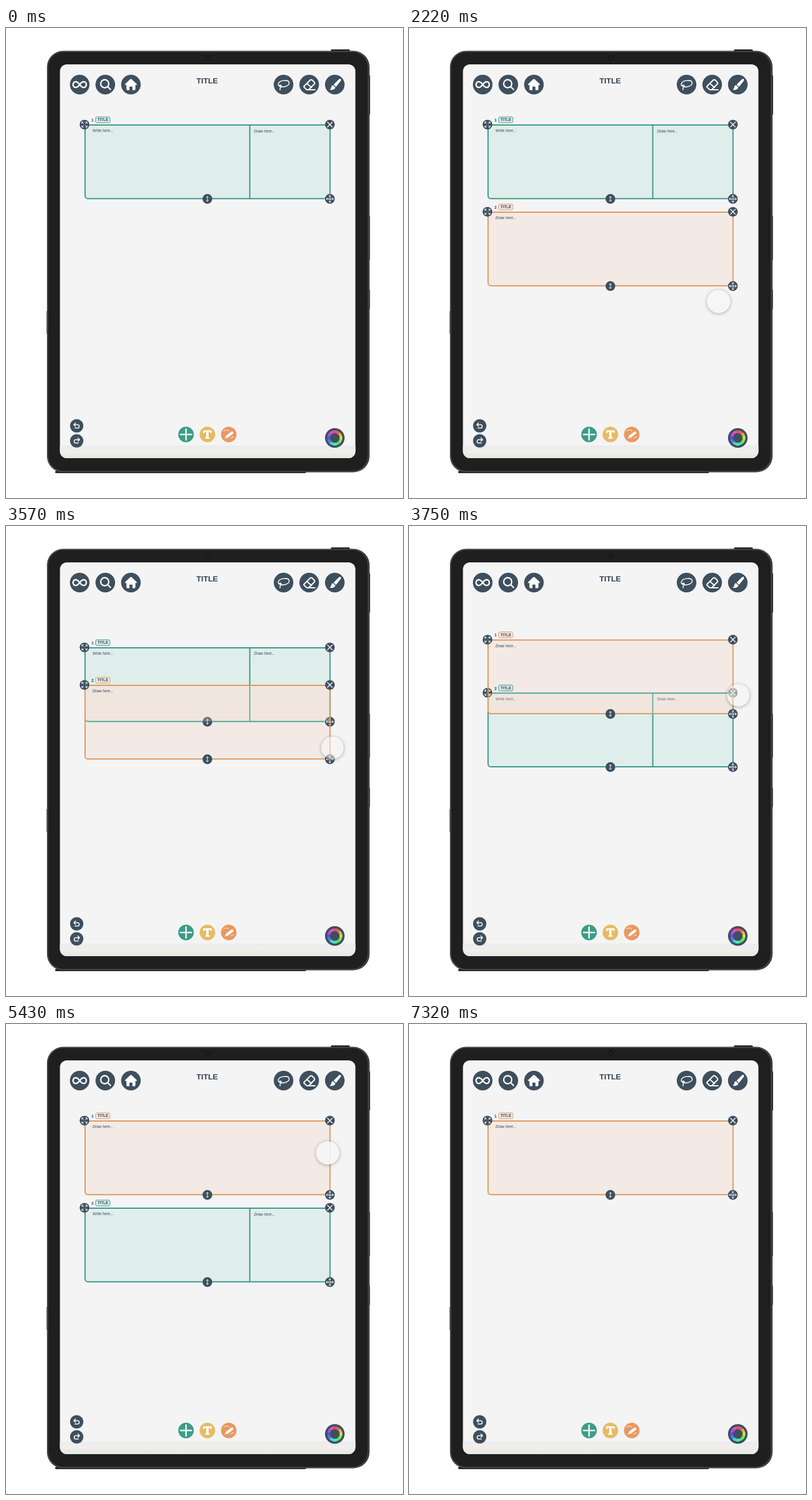
Recreate the animation shown at these times as an HTML page with a canvas. Size 688 by 814 pixels, loop 7350 ms.

```html
<!DOCTYPE html>
<html lang="en">
<head>
<meta charset="utf-8">
<title>Card board</title>
<style>
html, body { margin: 0; width: 100%; height: 100%; overflow: hidden; background: #fff; }
canvas { display: block; width: 688px; height: 814px; }
</style>
</head>
<body>
<canvas id="stage" width="688" height="814"></canvas>
<script>
const ctx = document.getElementById('stage').getContext('2d');
const LOOP = 7350;
const DARK = '#3e4f5e';
const FONT = '"Liberation Sans", Arial, sans-serif';
const ROW = 151;

const clamp = x => Math.max(0, Math.min(1, x));
const span = (t, a, b) => clamp((t - a) / (b - a));
const quad = u => u < .5 ? 2 * u * u : 1 - 2 * (1 - u) ** 2;
const cubic = u => u < .5 ? 4 * u ** 3 : 1 - 4 * (1 - u) ** 3;
const mix = (a, b, u) => a + (b - a) * u;

function disc(x, y, r, fill) {
  ctx.beginPath();
  ctx.arc(x, y, r, 0, Math.PI * 2);
  ctx.fillStyle = fill;
  ctx.fill();
}

function box(x, y, w, h, r, fill, stroke, line = 1) {
  ctx.beginPath();
  ctx.roundRect(x, y, w, h, r);
  if (fill) { ctx.fillStyle = fill; ctx.fill(); }
  if (stroke) { ctx.strokeStyle = stroke; ctx.lineWidth = line; ctx.stroke(); }
}

function label(text, x, y, font, align = 'left', fill = '#33445a') {
  ctx.font = `${font} ${FONT}`;
  ctx.textAlign = align;
  ctx.fillStyle = fill;
  ctx.fillText(text, x, y);
}

// Paths are centred on the button.
function icon(x, y, r, color, { line, width = 2, fill }) {
  disc(x, y, r, color);
  ctx.save();
  ctx.translate(x, y);
  ctx.lineCap = ctx.lineJoin = 'round';
  ctx.strokeStyle = ctx.fillStyle = '#fff';
  ctx.lineWidth = width;
  if (fill) ctx.fill(new Path2D(fill));
  if (line) ctx.stroke(new Path2D(line));
  ctx.restore();
}

function infinityPath() {
  let d = '';
  for (let i = 0; i <= 48; i++) {
    const a = i / 48 * Math.PI * 2, k = 1 + Math.sin(a) ** 2;
    d += `${i ? 'L' : 'M'}${11.5 * Math.cos(a) / k} ${14 * Math.sin(a) * Math.cos(a) / k}`;
  }
  return d + 'Z';
}

const ICONS = {
  infinity: { line: infinityPath(), width: 2.5 },
  search: { line: 'M6 -1.5A7 7 0 1 1 -8 -1.5A7 7 0 1 1 6 -1.5M4.2 3.7L9 8.5', width: 2.4 },
  home: { fill: 'M0 -9.8Q.8 -9.8 1.6 -9L10 -1Q11 .6 9.5 .8H7.8V8Q7.8 9.8 6 9.8H2.6V3.6H-2.6V9.8H-6Q-7.8 9.8 -7.8 8V.8H-9.5Q-11 .6 -10 -1L-1.6 -9Q-.8 -9.8 0 -9.8Z' },
  lasso: { line: 'M-7 3C-13 -1 -6 -7 1 -7C12 -8 12 0 4 3C-1 5 -6 4 -7 2C-7 0 -3 1 -4 3C-5 5 -7 5 -6 9', width: 1.6 },
  eraser: { line: 'M-9 3L2 -8Q3.5 -9 5 -8L9 -4Q10 -2.5 9 -1L-1 9H-4L-9 4.5ZM-4 -2L4 5M-1 9H10', width: 2.2 },
  brush: { fill: 'M9.5 -10Q12 -9 10 -6L2 4L-2 0L7 -9Q8.5 -10.5 9.5 -10ZM-3 1L1 5Q0 10 -9 9Q-6 7 -6 4Q-5.5 1 -3 1Z' },
  undo: { line: 'M-2 -5L-5 -2L-2 1M-5 -2H1.5A2.8 2.8 0 0 1 1.5 3.8H-3', width: 1.5 },
  redo: { line: 'M2 -5L5 -2L2 1M5 -2H-1.5A2.8 2.8 0 0 0 -1.5 3.8H3', width: 1.5 },
  plus: { line: 'M-9.5 0H9.5M0 -9.5V9.5', width: 2.4 },
  type: { fill: 'M-7.3 -7.3H7.3V-2.6H5.4Q5 -4.8 3.5 -4.8H2.1V4.2Q2.1 5.4 4 5.4V7.3H-4V5.4Q-2.1 5.4 -2.1 4.2V-4.8H-3.5Q-5 -4.8 -5.4 -2.6H-7.3Z' },
  scribble: { line: 'M-9 -6Q-4 -9.5 0 -6.5M-7 6.5Q-4 3 -3 6M3 6.5Q6 3.5 8.5 4', width: .9,
    fill: 'M-6 6.5L-4.5 2L4.5 -5Q7 -6 8 -3.5Q8.5 -2 7 -1L-1.5 5.5Z' },
  expand: { line: 'M-1.5 -1.5L-4.5 -4.5V-2M-4.5 -4.5H-2M1.5 -1.5L4.5 -4.5V-2M4.5 -4.5H2M-1.5 1.5L-4.5 4.5V2M-4.5 4.5H-2M1.5 1.5L4.5 4.5V2M4.5 4.5H2', width: 1 },
  close: { line: 'M-4.2 -4.2L4.2 4.2M4.2 -4.2L-4.2 4.2', width: 1.4 },
  resize: { line: 'M0 -4.2V4.2M-1.8 -2.5L0 -4.3L1.8 -2.5M-1.8 2.5L0 4.3L1.8 2.5', width: 1 },
  move: { line: 'M2 0A2 2 0 1 1 -2 0A2 2 0 1 1 2 0', width: 1.2,
    fill: 'M0 -6.8L2.4 -4H-2.4ZM0 6.8L2.4 4H-2.4ZM-6.8 0L-4 -2.4V2.4ZM6.8 0L4 -2.4V2.4Z' }
};

function tablet() {
  ctx.fillStyle = '#fff';
  ctx.fillRect(0, 0, 688, 814);
  box(563, 37, 33, 6, 2, '#292929');
  box(627, 82, 4, 68, 1, '#333');
  for (const [y, h] of [[325, 77], [453, 34]]) box(628, y, 2.7, h, 1, '#333');
  box(70.3, 490, 3, 40, 1, '#555');
  box(85, 767, 435, 4, 2, '#2b2b2b');
  box(71, 39.5, 559, 730, 28, '#2c2c2c');
  box(72.3, 40.8, 555.5, 727.2, 27, '#1f1f1f', '#4d4e50', 1.6);
  disc(350, 51, 4.5, '#171717');
  disc(350, 51, 1.7, '#292b30');

  ctx.save();
  box(93.5, 63, 512, 682, 12, '#f4f4f4');
  ctx.clip();
  const foot = ctx.createLinearGradient(0, 723, 0, 745);
  [[0, '#ececec'], [.55, '#efefef'], [.67, '#f2e9e2'], [.77, '#f2e8e0'], [.84, '#e2ebe8'], [1, '#e2ebe8']]
    .forEach(([at, color]) => foot.addColorStop(at, color));
  ctx.fillStyle = foot;
  ctx.fillRect(93, 723, 513, 22);
  ctx.restore();
}

function toolbar() {
  ['infinity', 'search', 'home'].forEach((n, i) => icon(127.7 + 44.4 * i, 98, 17, DARK, ICONS[n]));
  ['lasso', 'eraser', 'brush'].forEach((n, i) => icon(481 + 44.4 * i, 98, 17, DARK, ICONS[n]));
  label('TITLE', 348.7, 96, 'bold 13.4px', 'center');
  icon(122.5, 689, 11.5, DARK, ICONS.undo);
  icon(122.5, 715, 11.5, DARK, ICONS.redo);
  icon(312, 704, 13.5, '#3c9c87', ICONS.plus);
  icon(349, 704, 13.5, '#e6bb66', ICONS.type);
  icon(386, 704, 13.5, '#e99861', ICONS.scribble);

  disc(569.8, 710, 17, DARK);
  for (let i = 0; i < 12; i++) {
    const a = (i - 3.5) * Math.PI / 6;
    ctx.beginPath();
    ctx.arc(569.8, 710, 10.8, a, a + Math.PI / 6 + .02);
    ctx.lineWidth = 4.8;
    ctx.strokeStyle = `hsl(${340 + 30 * i} 75% 60%)`;
    ctx.stroke();
  }
}

const TEAL = { color: '#35958a', fill: '#dfeeea', split: true };
const ORANGE = { color: '#e0955b', fill: '#f3eae5', split: false };

function cardFill(style, shift) {
  box(137, 168 + shift, 424.5, 127.5, 5, style.fill);
}

function cardDetail(style, number, shift) {
  ctx.save();
  ctx.translate(0, shift);
  box(137, 168, 424.5, 127.5, 5, null, style.color, 2);
  label(number, 148, 162, 'bold 7px');
  box(155.5, 154, 24.5, 10, 2, style.fill, style.color, 1);
  label('TITLE', 167.8, 161.3, 'bold 6.7px', 'center');
  label(style.split ? 'Write here...' : 'Draw here...', 150, 180.2, 'italic 6.6px');
  if (style.split) {
    ctx.fillStyle = style.color;
    ctx.fillRect(421.5, 168, 2, 127);
    label('Draw here...', 430, 180.5, 'italic 6.6px');
  }
  icon(136, 167.3, 8.4, DARK, ICONS.expand);
  icon(561.3, 167.3, 8.4, DARK, ICONS.close);
  icon(349, 296, 8.4, DARK, ICONS.resize);
  icon(561.3, 296, 8.4, DARK, ICONS.move);
  ctx.restore();
}

// Tints the area shared by the two cards.
function overlap(a, b, alpha) {
  const h = 127.5 - Math.abs(a - b);
  if (h > 0) box(137, 168 + Math.max(a, b), 424.5, h, 0, `rgba(240,230,221,${alpha})`);
}

function cards(t) {
  const swap = cubic(span(t, 3232, 4050));
  const swapped = swap > .5;
  const tealY = ROW * swap, orangeY = ROW - tealY;
  const hasTeal = t < 6450, hasOrange = t >= 1080;
  const both = hasTeal && hasOrange;

  if (hasTeal) cardFill(TEAL, tealY);
  if (hasOrange) cardFill(ORANGE, orangeY);
  if (both) overlap(tealY, orangeY, 1);
  if (hasTeal) cardDetail(TEAL, swapped ? 2 : 1, tealY);
  if (both) overlap(tealY, orangeY, .28);
  if (hasOrange) cardDetail(ORANGE, swapped ? 1 : 2, orangeY);
}

// Each leg: start, end, destination, easing.
const START = [440, 610];
const LEGS = [
  [330, 800, [386, 699], quad],
  [1400, 2530, [563, 434], quad],
  [3232, 4050, [572.5, 259], cubic],
  [4450, 5080, [556.5, 198], quad],
  [5100, 6120, [561, 318], quad]
];
const PRESSES = [[800, 1080], [2700, 4150], [6180, 6480]];

function pointer(t) {
  const show = span(t, 330, 500) * (1 - span(t, 6650, 7050));
  if (!show) return;
  let [x, y] = START;
  for (const [from, to, goal, ease] of LEGS) {
    const u = ease(span(t, from, to));
    x = mix(x, goal[0], u);
    y = mix(y, goal[1], u);
  }
  const press = Math.max(...PRESSES.map(([a, b]) => span(t, a, a + 120) * (1 - span(t, b, b + 150))));
  const r = 20 - press * .7;

  ctx.save();
  ctx.globalAlpha = show;
  ctx.save();
  ctx.beginPath();
  ctx.rect(0, 0, 688, 814);
  ctx.arc(x, y, r, 0, Math.PI * 2);
  ctx.clip('evenodd');
  ctx.shadowColor = 'rgba(0,0,0,.33)';
  ctx.shadowBlur = 6;
  ctx.shadowOffsetY = 1;
  disc(x, y, r, '#fff');
  ctx.restore();
  disc(x, y, r, `rgba(247,247,247,${mix(.87, .53, press)})`);
  ctx.restore();
}

function tick() {
  const t = performance.now() % LOOP;
  tablet();
  toolbar();
  cards(t);
  pointer(t);
  requestAnimationFrame(tick);
}
tick();
</script>
</body>
</html>
```
